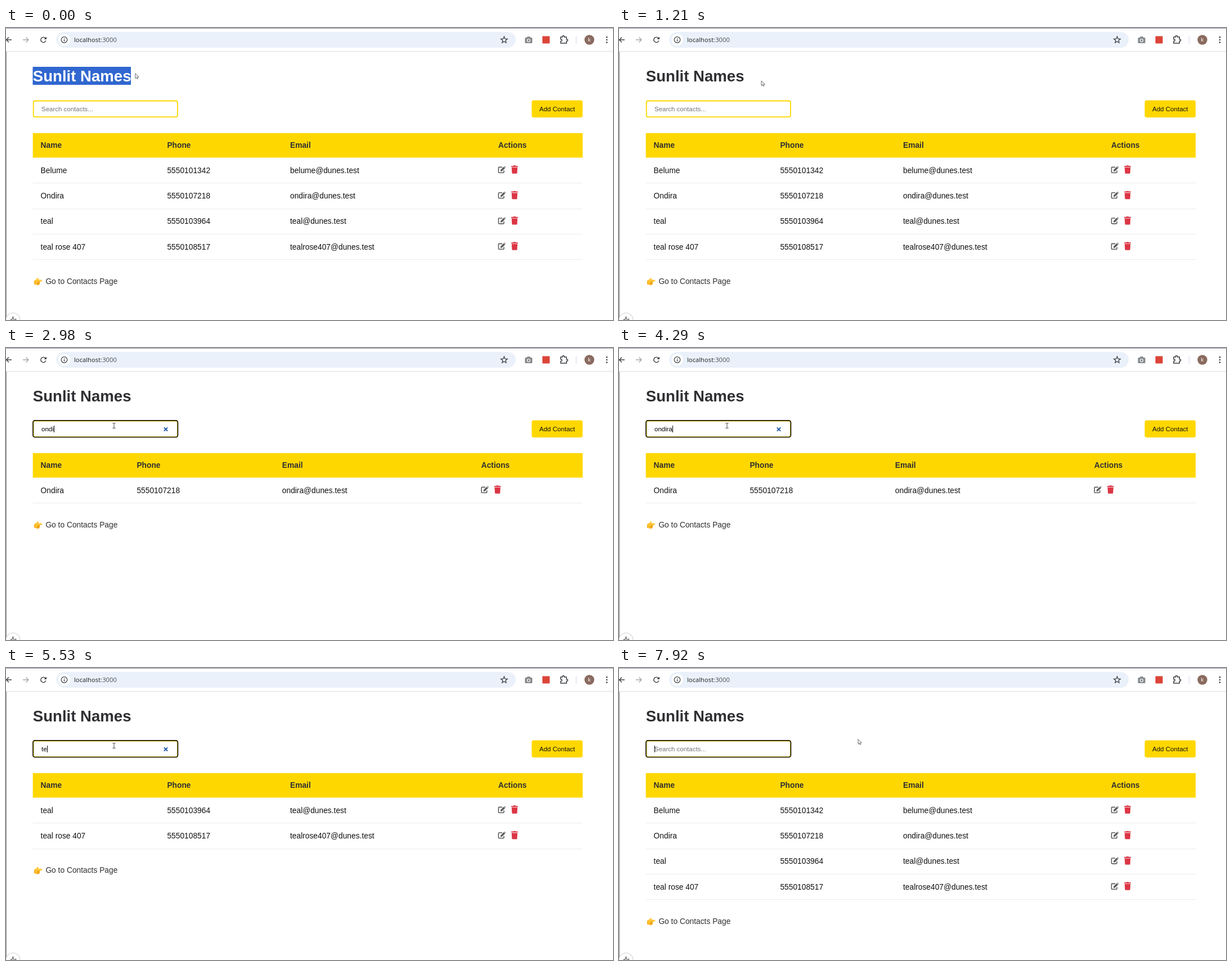
An HTML page with a canvas for the animation above (8 s loop, 1079 by 519 pixels).

```html
<!DOCTYPE html>
<html lang="en">
<head>
<meta charset="utf-8">
<title>Contacts</title>
<style>
  html, body { margin: 0; width: 100%; height: 100%; overflow: hidden; background: #fff; }
  canvas { display: block; }
</style>
</head>
<body>
<canvas id="stage" width="1079" height="519"></canvas>
<script>
const ctx = document.getElementById('stage').getContext('2d');
const LOOP = 8000;
const SANS = '"Liberation Sans", Arial, sans-serif';
const GOLD = '#ffd700';
const INK = '#2f2f33';

const contacts = [
  ['Belume', '5550101342', 'belume@dunes.test'],
  ['Ondira', '5550107218', 'ondira@dunes.test'],
  ['teal', '5550103964', 'teal@dunes.test'],
  ['teal rose 407', '5550108517', 'tealrose407@dunes.test']
];

// [start ms, value...]: each entry holds until the next one
const queries = [
  [0, ''], [2830, 'on'], [2980, 'ondi'], [3120, 'ondir'], [3250, 'ondira'],
  [4420, 'ondir'], [4570, 'ondi'], [4700, 'ond'], [4820, 'o'], [4970, ''],
  [5400, 't'], [5530, 'te'], [5660, 'teal'], [6700, 'tea'], [6840, 'te'],
  [6970, 't'], [7110, '']
];
const carets = [
  [0, false], [1890, true], [2420, false], [2830, true], [3780, false],
  [4290, true], [4970, false], [5400, true], [6190, false], [6700, true],
  [7260, false], [7790, true]
];
const pointers = [
  [0, 229.5, 80.5], [140, 226.5, 81], [290, 252, 92], [410, 296, 116], [540, 255, 108],
  [690, 225, 122], [820, 186, 140, 'beam'], [940, 224, 112], [1070, 253, 95],
  [1210, 252.7, 93.5], [1350, 234, 98], [1480, 206.5, 107], [1630, 198, 114],
  [1760, 193, 134, 'beam'], [1890, 192, 138, 'beam'], [7640, 212, 138, 'beam'],
  [7790, 290, 135, 'beam'], [7920, 424.7, 126.3]
];
const at = (track, t) => track.filter(step => step[0] <= t).pop();

function text(str, x, y, size, color, weight = 'normal', family = SANS) {
  ctx.font = `${weight} ${size}px ${family}`;
  ctx.fillStyle = color;
  ctx.fillText(str, x, y);
  return ctx.measureText(str).width;
}

function rect(x, y, w, h, color) {
  ctx.fillStyle = color;
  ctx.fillRect(x, y, w, h);
}

function box(x, y, w, h, r, fill, stroke, width = 1) {
  ctx.beginPath();
  ctx.roundRect(x, y, w, h, r);
  paint(fill, stroke, width);
}

function circle(x, y, r, fill, stroke, width = 1) {
  ctx.beginPath();
  ctx.arc(x, y, r, 0, Math.PI * 2);
  paint(fill, stroke, width);
}

function shape(d, x, y, fill, stroke, width = 1) {
  ctx.save();
  ctx.translate(x, y);
  const path = new Path2D(d);
  ctx.lineWidth = width;
  if (fill) { ctx.fillStyle = fill; ctx.fill(path); }
  if (stroke) { ctx.strokeStyle = stroke; ctx.stroke(path); }
  ctx.restore();
}

function paint(fill, stroke, width) {
  if (fill) { ctx.fillStyle = fill; ctx.fill(); }
  if (stroke) { ctx.strokeStyle = stroke; ctx.lineWidth = width; ctx.stroke(); }
}

function star(x, y, outer, inner) {
  ctx.beginPath();
  for (let i = 0; i < 10; i++) {
    const a = -Math.PI / 2 + i * Math.PI / 5, r = i % 2 ? inner : outer;
    ctx.lineTo(x + r * Math.cos(a), y + r * Math.sin(a));
  }
  ctx.closePath();
  paint(null, '#3c4043', 1.3);
}

function drawBrowser() {
  rect(0, 0, 1079, 1, '#8c929f');
  rect(0, 41, 1079, 1, '#dcdddf');
  rect(0, 42, 1, 477, '#85878b');

  shape('M10 0H1M5 -4.5L.5 0L5 4.5', 0, 21, null, '#3c4043', 1.4);
  shape('M0 0H9.5M5.5 -4.5L10 0L5.5 4.5', 30, 21, null, '#a3a5a8', 1.3);
  ctx.beginPath();
  ctx.arc(66.5, 21, 4.6, 0.3, Math.PI * 1.78);
  paint(null, '#3c4043', 1.4);
  shape('M5.5 -5.5V-1H1Z', 66.5, 21, '#3c4043');

  box(89.5, 7, 816.5, 28, 14, '#eaf1fa');
  circle(103.5, 21, 10.5, '#fff');
  circle(103.5, 21, 5.3, null, '#3c4043', 1.2);
  rect(102.9, 20.2, 1.3, 3.7, '#3c4043');
  rect(102.9, 17.9, 1.3, 1.3, '#3c4043');
  const family = '"Open Sans", "Noto Sans", sans-serif';
  const width = text('localhost', 121, 25, 11.25, '#202124', 'normal', family);
  text(':3000', 121 + width, 25, 11.25, '#4c5056', 'normal', family);
  star(885.5, 21.3, 6, 2.7);

  box(922.5, 17, 13, 10, 1.5, '#85888c');
  box(926, 15.2, 6, 3, 1, '#85888c');
  circle(929, 22, 3.1, '#fff');
  circle(929, 22, 1.9, '#85888c');
  box(953.5, 14.5, 13, 13, 1, '#dc4437');
  shape('M0 0H3.2C2.6 -3.2 7 -3.2 6.4 0H10.3V4C13.4 3.4 13.4 7.8 10.3 7.2V11H0V7.4C3 7.8 3 3.6 0 4Z',
    986, 16, null, '#3c4043', 1.5);
  rect(1013, 14, 1, 14, '#cbdcf3');
  circle(1037, 21, 8.7, '#8a6a5e');
  text('k', 1034.4, 24.3, 9.5, '#fff');
  for (const y of [16.3, 21, 25.7]) circle(1068, y, 1.35, '#3c4043');
}

function drawHeading(selected) {
  if (selected) rect(47.5, 69, 174.5, 32, '#3067d0');
  text('Sunlit Names', 47.8, 94.6, 27.58, selected ? '#fff' : INK, 'bold');
}

function drawSearch(query, focused, caret) {
  box(48.7, 129.5, 256.2, 28.6, 3, '#fff', GOLD, 1.8);
  if (focused) box(48, 128.9, 257.4, 29.6, 3.5, null, '#141206', 1.7);
  const width = text(query || 'Search contacts...', 63, 147.6, 11.49, query ? '#000' : '#757575');
  if (caret) rect(Math.round(63 + (query ? width : 0)), 138, 1, 12, '#000');
  if (query) shape('M-3.1 -3.1L3.1 3.1M3.1 -3.1L-3.1 3.1', 284, 144.5, null, '#1c5aa6', 2);

  box(934.5, 128.5, 90.5, 30.5, 3.5, GOLD);
  text('Add Contact', 948, 147.6, 11.55, '#111');
}

function drawActions(x, y) {
  const gray = '#5c5c5c';
  shape('M7.5 1.8H1.8Q.8 1.8 .8 2.8V10.6Q.8 11.6 1.8 11.6H9.4Q10.4 11.6 10.4 10.6V7.6',
    x - .3, y - 6.2, null, gray, 1.6);
  shape('M4 6.3L9.6 .7L12 3.1L6.4 8.7L3.6 9.1Z M10.3 .1Q11 -.5 11.8 .2L12.7 1.1Q13.3 1.8 12.7 2.5Z',
    x + .3, y - 6, gray);

  const left = x + 23;
  const red = '#dc3545';
  box(left, y - 6.6, 12, 1.8, .5, red);
  box(left + 3.8, y - 7.5, 4.4, 1.6, .6, red);
  shape('M.8 -4H11.2L10.6 5.8Q10.5 7 9.3 7H2.7Q1.5 7 1.4 5.8Z', left, y, red);
}

function drawHand(y) {
  box(50, y - 1.8, 4, 7.5, 1.5, '#f5a91f');
  box(51.5, y - 3.5, 8.5, 10, 3, '#ffc22e');
  box(54, y - 2.8, 10.3, 3.2, 1.6, '#ffc83d');
  shape('M0 4L3.2 -.2Q4.6 -1.2 5.4 .2L3.7 4Z', 52.6, y - 5.7, '#ffc83d');
  for (let i = 0; i < 3; i++) box(55.5 - i * .3, y + .5 + i * 2, 5 - i * .5, 1.8, .9, '#ef9f19');
}

function drawTable(rows) {
  const wide = rows.length > 1;
  const columns = wide ? [61.6, 286.4, 505, 875] : [61.6, 232.4, 490.8, 844.7];
  rect(47.7, 186.8, 977.4, 43.6, GOLD);
  ['Name', 'Phone', 'Email', 'Actions'].forEach((label, i) =>
    text(label, columns[i], 213.2, 13.79, INK, 'bold'));

  const step = 45.33;
  rows.forEach((row, r) => {
    const top = 230.5 + r * step;
    row.forEach((cell, i) => text(cell, columns[i], Math.round(top + 27.3), 13.79, '#111'));
    drawActions(columns[3], top + 21.3);
    rect(47.7, Math.round(top + step - .5), 977.4, 1, '#ececec');
  });

  const end = 230.5 + rows.length * step;
  drawHand(end + 38.5);
  text('Go to Contacts Page', 70.4, Math.round(end + 42.8), 13.79, INK);
}

function drawBadge() {
  circle(12.5, 519, 12.5, '#fff', '#d2d2d4', 1.2);
  shape('M-5 1H-2L0 -4L2.5 4L4 0H6', 12.5, 517.5, null, '#66686d', 1.3);
}

function drawPointer([, x, y, kind]) {
  if (kind === 'beam') {
    shape('M-2.5 -4.5H-.7L0 -4L.7 -4.5H2.5M0 -4V4M-2.5 4.5H-.7L0 4L.7 4.5H2.5', x, y, null, '#444', 1);
  } else {
    shape('M.4 .4V9L2.4 7.2L3.8 10.1L5.1 9.5L3.8 6.7H6.6Z', x, y, '#fff', '#55565c', .9);
  }
}

function draw(t) {
  const query = at(queries, t)[1];
  rect(0, 0, 1079, 519, '#fff');
  drawBrowser();
  drawHeading(t < 1210);
  drawSearch(query, t >= 1890, at(carets, t)[1]);
  drawTable(contacts.filter(([name]) => name.toLowerCase().startsWith(query.slice(0, 4))));
  drawBadge();
  drawPointer(at(pointers, t));
}

const start = performance.now();
function tick() {
  draw((performance.now() - start) % LOOP);
  requestAnimationFrame(tick);
}
tick();
</script>
</body>
</html>
```
